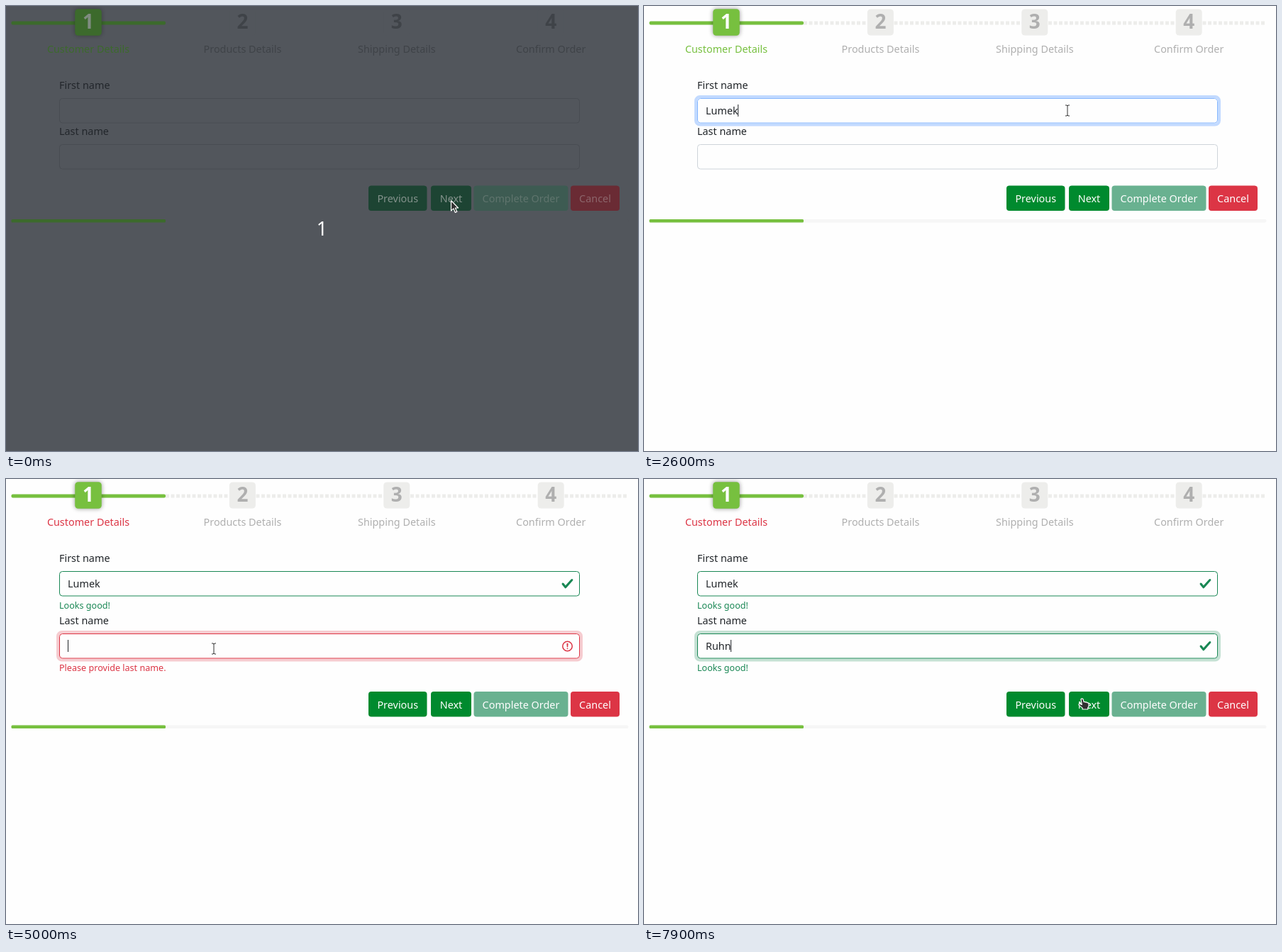
These frames come from a looping animation (891x628 px, 8000 ms). An HTML page:

```html
<!DOCTYPE html>
<html lang="en">
<head>
<meta charset="utf-8">
<title>Order wizard</title>
<style>
  html, body { margin: 0; width: 100%; height: 100%; overflow: hidden; }
  svg {
    --page: #fefefe; --ink: #212529; --line: #ced4da; --muted: #afafaf; --tile: #ededeb;
    --track: #f6f6f6; --accent: #77c03f; --digit: #fefefe; --go: #008a2e; --goText: #fefefe;
    --off: #69b190; --offText: #fefefe; --stop: #dc3545; --stopText: #fefefe; --shade: .42;
    display: block; width: 891px; height: 628px; background: var(--page);
    font: 14.4px "Noto Sans", "Open Sans", sans-serif;
  }
  svg.veiled {
    --page: #52565c; --ink: #23272c; --line: #484c52; --muted: #3f4348; --tile: #52565c;
    --track: #52565c; --accent: #3c6a2c; --digit: #7f8c80; --go: #1d4433; --goText: #84928c;
    --off: #3d5b52; --offText: #5f746d; --stop: #6a2b34; --stopText: #8c656b; --shade: .3;
  }
  text { fill: var(--ink); }
  .mid { text-anchor: middle; }
  .digit { font-size: 28px; font-weight: 700; }
  .small { font-size: 12.6px; }
  .box { fill: var(--page); stroke: var(--line); }
  .ring { fill: none; stroke-width: 4; stroke-opacity: .25; }
  .good { fill: #198754; }
  .bad { fill: #dc3545; }
  .pointer path { fill: #303030; stroke: #fff; stroke-width: 1.2; stroke-linejoin: round; }
</style>
</head>
<body>
<svg id="stage" viewBox="0 0 891 628">
  <defs>
    <filter id="glow" x="-40%" y="-40%" width="180%" height="180%">
      <feGaussianBlur stdDeviation="3"/>
    </filter>
  </defs>

  <g id="steps"></g>

  <text x="75" y="117">First name</text>
  <g id="first"></g>
  <text id="praise" class="small good" x="75" y="183">Looks good!</text>
  <g id="lower">
    <text x="75" y="182">Last name</text>
    <g id="last" transform="translate(0 65)"></g>
    <text id="verdict" class="small" x="75" y="248"></text>
  </g>

  <g id="footer">
    <rect id="nextRing" class="ring" x="597" y="251.5" width="61" height="39.5" rx="6" stroke="#0d6efd"/>
    <g id="buttons"></g>
    <rect x="7.5" y="301" width="870" height="4.5" rx="2" fill="var(--track)"/>
    <rect x="7.5" y="301" width="217.5" height="4.5" rx="1.5" fill="var(--accent)"/>
  </g>

  <text id="count" class="mid" x="445.5" y="324" style="font-size:27px;fill:#fff">1</text>

  <g id="pointer" class="pointer">
    <path id="arrow" d="M.5 .5V15l3.4-3.1 2.5 5.5 2.4-1.1-2.4-5.3h4.2Z"/>
    <path id="hand" d="M-1.5 1.2Q0-.6 1.5 1.2L2.6 5.2Q4.2 4.4 5 5.6 6.5 5 7.3 6.2 9.3 5.8 9.5 8V11.5L8.3 13.2V15.5H.6V13.6L-4.4 9.6Q-5 7.8-3.2 7.6L-.2 9Z"/>
    <g id="beam" fill="none">
      <path d="M-3-7.5H-1L0-6.5 1-7.5H3M0-6.5V6.5M-3 7.5H-1L0 6.5 1 7.5H3" style="fill:none;stroke:#fff;stroke-width:2.4"/>
      <path d="M-3-7.5H-1L0-6.5 1-7.5H3M0-6.5V6.5M-3 7.5H-1L0 6.5 1 7.5H3" style="fill:none;stroke:#303030;stroke-width:1"/>
    </g>
  </g>
</svg>

<script>
const $ = id => document.getElementById(id);
const show = (el, on) => el.setAttribute('visibility', on ? 'visible' : 'hidden');
const shift = (el, x, y) => el.setAttribute('transform', `translate(${x} ${y})`);
const clamp = v => Math.max(0, Math.min(1, v));

const LOOP = 8000, TICK = 100;
const VALIDATED = 4200, CORRECTED = 6000;
const BLUE = '#0d6efd', BLUE_LINE = '#86b7fe', GREEN = '#198754', RED = '#dc3545';

// Step header
$('steps').innerHTML =
  `<line x1="225" x2="877" y1="24" y2="24" stroke="var(--tile)" stroke-width="5" stroke-dasharray="5 2.5"/>
   <rect x="7.5" y="21.5" width="217.5" height="5" rx="2" fill="var(--accent)"/>` +
  ['Customer', 'Products', 'Shipping', 'Confirm'].map((word, i) => {
    const x = 116 + i * 217.4, active = i === 0, size = active ? 37.5 : 37;
    const tile = `x="${x - size / 2}" y="${23 - size / 2}" width="${size}" height="${size}" rx="4.5"`;
    return (active ? `<rect ${tile} opacity="var(--shade)" style="opacity:var(--shade)" filter="url(#glow)"/>` : '') +
      `<rect ${tile} fill="var(${active ? '--accent' : '--tile'})"/>
       <text class="mid digit" x="${x}" y="32.3" style="fill:var(${active ? '--digit' : '--muted'})">${i + 1}</text>
       <text class="mid" id="label${i}" x="${x}" y="66" style="fill:var(${active ? '--accent' : '--muted'})">${word} ${i < 3 ? 'Details' : 'Order'}</text>`;
  }).join('');

// Buttons
$('buttons').innerHTML = [
  ['Previous', 511, 82.5, 'go'], ['Next', 599, 57, 'go'],
  ['Complete Order', 659.5, 133, 'off'], ['Cancel', 796, 69, 'stop']
].map(([name, x, w, kind]) =>
  `<rect x="${x}" y="253.5" width="${w}" height="35.5" rx="4" fill="var(--${kind})"/>
   <text class="mid" x="${x + w / 2}" y="277" style="fill:var(--${kind}Text)">${name}</text>`).join('');

// Text inputs
function makeField(id) {
  const g = $(id);
  g.innerHTML =
    `<rect class="ring" x="73" y="128" width="738" height="39.5" rx="6"/>
     <rect class="box" x="75.5" y="130.5" width="733" height="34.5" rx="4"/>
     <text x="87" y="153"></text>
     <rect y="139" width="1" height="17" fill="#212529"/>
     <path class="good" transform="translate(782.5 138.7) scale(2.25)" d="M2.3 6.73.6 4.53c-.4-1.04.46-1.4 1.1-.8l1.1 1.4 3.4-3.8c.6-.63 1.6-.27 1.2.7l-4 4.6c-.43.5-.8.4-1.1.1z"/>
     <g transform="translate(782.5 139) scale(1.5)" fill="none" stroke="${RED}">
       <circle cx="6" cy="6" r="4.5"/><path stroke-linejoin="round" d="M5.8 3.6h.4L6 6.5z"/>
       <circle cx="6" cy="8.2" r=".6" fill="${RED}" stroke="none"/>
     </g>`;
  const [ring, box, text, caret, tick, alert] = g.children;
  return ({ value, focus, color, line, caretOn, state }) => {
    ring.setAttribute('stroke', color);
    ring.setAttribute('opacity', focus);
    box.style.stroke = line || '';
    text.textContent = value;
    caret.setAttribute('x', 87 + (value ? text.getComputedTextLength() - .5 : 0));
    show(caret, caretOn);
    show(tick, state === 'good');
    show(alert, state === 'bad');
  };
}
const drawFirst = makeField('first'), drawLast = makeField('last');

const typed = (word, times, t) => word.slice(0, times.filter(at => t >= at).length);
const within = (t, spans) => spans.some(([a, b]) => t >= a && t < b);

// CSS "ease" timing, solved by bisection
function ease(p) {
  const bez = (a, b, s) => 3 * a * s * (1 - s) ** 2 + 3 * b * s * s * (1 - s) + s ** 3;
  let lo = 0, hi = 1;
  for (let i = 0; i < 20; i++) {
    const m = (lo + hi) / 2;
    if (bez(.25, .25, m) < p) lo = m; else hi = m;
  }
  return bez(.1, 1, lo);
}

// Pointer stops: time, x, y
const stops = [
  [0, 627, 274], [100, 629.5, 275], [300, 626, 255], [600, 608, 185], [900, 597, 147.5],
  [3200, 597, 147.5], [3400, 672, 168], [3600, 739, 226], [3800, 690, 278], [4000, 638.5, 268.5],
  [4100, 638, 268.5], [4200, 575, 262], [4300, 430, 243], [4400, 316.5, 230.5], [4600, 288, 236],
  [4900, 293, 239.5], [7200, 293, 239.5], [7400, 385, 252], [7600, 540, 291], [7800, 625, 310], [7900, 617.5, 309.5]
];
function pointerAt(t) {
  const i = stops.findIndex(s => s[0] > t);
  if (i < 0) return stops[stops.length - 1].slice(1);
  const [a, x, y] = stops[i - 1], [b, u, v] = stops[i], p = (t - a) / (b - a);
  return [x + (u - x) * p, y + (v - y) * p];
}

function drawPointer(t, drop, grow) {
  const [x, y] = pointerAt(t);
  const overField = x > 75 && x < 809 &&
    (y > 130 && y < 165 || y > 195 + drop && y < 230 + drop);
  const by = y - grow;
  const overButton = by > 253 && by < 289 &&
    (x > 511 && x < 593 || x > 599 && x < 656 || x > 796 && x < 865);
  const kind = t === 0 ? 'arrow' : overField ? 'beam' : overButton ? 'hand' : 'arrow';
  for (const k of ['arrow', 'hand', 'beam']) show($(k), k === kind);
  shift($('pointer'), x, y);
}

function render(t) {
  const validated = t >= VALIDATED, corrected = t >= CORRECTED;
  const drop = validated ? 23 : 0;
  const grow = 46.5 * ease(clamp((t - VALIDATED) / 400));

  $('stage').classList.toggle('veiled', t === 0);
  show($('count'), t === 0);
  $('label0').style.fill = validated ? RED : 'var(--accent)';
  show($('praise'), validated);
  shift($('lower'), 0, drop);
  shift($('footer'), 0, grow);

  const focus1 = t < 4100 ? clamp((t - 800) / 200) : clamp((4200 - t) / 200);
  drawFirst({
    value: typed('Lumek', [1900, 2000, 2200, 2500, 2600], t),
    focus: focus1, color: BLUE,
    line: validated ? GREEN : focus1 > 0 ? BLUE_LINE : '',
    caretOn: within(t, [[900, 1500], [1900, 3200], [3700, 4000]]),
    state: validated ? 'good' : ''
  });
  drawLast({
    value: typed('Ruhn', [CORRECTED, 6200, 6400, 6600], t),
    focus: clamp((t - 4800) / 200),
    color: corrected ? GREEN : RED,
    line: corrected ? GREEN : validated ? RED : '',
    caretOn: within(t, [[4900, 5400], [5900, 7200], [7700, LOOP]]),
    state: corrected ? 'good' : validated ? 'bad' : ''
  });

  const verdict = $('verdict');
  verdict.textContent = corrected ? 'Looks good!' : validated ? 'Please provide last name.' : '';
  verdict.style.fill = corrected ? GREEN : RED;
  $('nextRing').setAttribute('opacity', t < 4900 ? clamp((t - 4000) / 200) : 0);

  drawPointer(t, drop, grow);
}

const start = performance.now();
function frame() {
  const elapsed = Math.max(0, performance.now() - start);
  render(Math.floor(elapsed / TICK) * TICK % LOOP);
  requestAnimationFrame(frame);
}
frame();
</script>
</body>
</html>
```
